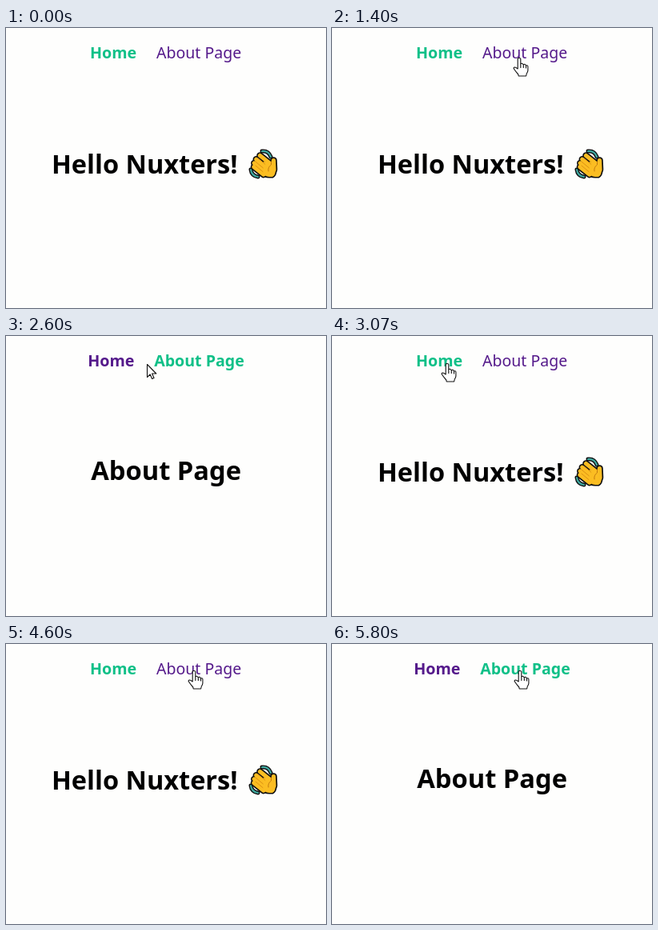
These frames come from a looping animation (400 by 350 pixels, 6.54 s). An HTML page with a canvas:

```html
<!DOCTYPE html>
<html lang="en">
<head>
<meta charset="utf-8">
<title>Page navigation</title>
<style>
html, body { margin: 0; width: 100%; height: 100%; overflow: hidden; background: #fefefd; }
canvas { display: block; }
</style>
</head>
<body>
<canvas id="stage" width="400" height="350"></canvas>
<script>
const ctx = document.getElementById('stage').getContext('2d');
const LOOP = 6540;
const STEP = 1000 / 15;
const FAMILY = '"Noto Sans", "Open Sans", sans-serif';
const PAPER = '#fefefd', INK = '#000', GREEN = '#10c088', PURPLE = '#551a8b';

const aboutShown = t => (t >= 1470 && t < 3000) || t >= 4870;

// Pointer journey: each leg eases from the previous resting place
const ENTRY = { time: 66, x: 250, y: 271 };
const legs = [
  { start: 66, end: 800, x: 234, y: 42 },
  { start: 1000, end: 1400, x: 234, y: 37 },
  { start: 2200, end: 2870, x: 144, y: 34 },
  { start: 3200, end: 3670, x: 235, y: 33 }
];

function ease(k) {
  k = Math.min(1, Math.max(0, k));
  return k * k * (3 - 2 * k);
}

function pointerAt(t) {
  let { x, y } = ENTRY;
  for (const leg of legs) {
    const e = ease((t - leg.start) / (leg.end - leg.start));
    x += (leg.x - x) * e;
    y += (leg.y - y) * e;
  }
  return { x: Math.round(x), y: Math.round(y) };
}

function text(str, x, y, size, weight, color) {
  ctx.font = `${weight} ${size}px ${FAMILY}`;
  ctx.fillStyle = color;
  ctx.fillText(str, x, y);
}

function curve(d, width, color) {
  ctx.lineWidth = width;
  ctx.strokeStyle = color;
  ctx.stroke(new Path2D(d));
}

function wave() {
  const dark = '#101010', skin = '#fbbd22';
  const arcs = 'M320 154 Q328 153 331 161 M306 177 Q307 185 315 186';
  curve(arcs, 5, dark);
  curve(arcs, 2.2, '#3fa9a0');

  let fingers = '', creases = '';
  for (let i = 0; i < 4; i++) {
    const x = 317.5 - 2.5 * i - 2.5 * Math.sin(Math.PI * i / 3);
    const y = 159.5 + 4.7 * i;
    fingers += `M${x} ${y} l12 9.5 `;
    if (i) creases += `M${x + 2} ${y - 1.5} l9 7.5 `;
  }
  const thumb = 'M334.5 165.5 L335 177 ';
  const palm = 'M318 179 Q323 186 329 186 L333 186 Q337 184 337 177 L336 170 L322 167 Z';
  curve(fingers + thumb, 8.6, dark);
  curve(palm, 3.2, dark);
  curve(fingers + thumb, 5.2, skin);
  ctx.fillStyle = skin;
  ctx.fill(new Path2D(palm));
  curve(creases, 0.9, '#d88c12');
  curve('M331.5 167 V171 Q327 174 328 179', 1, '#c47a10');
}

const hand = new Path2D('M-1.8 13 V1.6 Q-1.8 .5 0 .5 Q1.8 .5 1.8 1.6 V8 ' +
  'Q3.5 6 5.3 9 Q7 7 8.5 10 Q10.9 9 10.9 11.5 V16 Q10.8 18 9.3 20 L8.6 23 H-.8 L-1.2 21 ' +
  'Q-4 18 -6.8 13.8 Q-7 10 -1.8 14 Z M1.8 8 V12.5 M5.3 9 V12.5 M8.5 10 V13');
const arrow = new Path2D('M.5 .5 V16.5 L4.2 13 L6.6 18.5 L9 17.5 L6.6 12 H11.8 Z');

function pointer({ x, y }) {
  const overLink = y < 46 && (x < 164 || x > 185);
  const shape = overLink ? hand : arrow;
  ctx.save();
  ctx.translate(x, y);
  ctx.fillStyle = '#fff';
  ctx.strokeStyle = '#111';
  ctx.lineWidth = 1.1;
  ctx.fill(shape);
  ctx.stroke(shape);
  ctx.restore();
}

function homePage() {
  text('Home', 105, 38, 19.7, 700, GREEN);
  text('About Page', 188, 38, 19.5, 400, PURPLE);
  text('Hello Nuxters!', 57, 181.5, 32.5, 700, INK);
  wave();
}

function aboutPage() {
  text('Home', 102.2, 38, 19.7, 700, PURPLE);
  text('About Page', 185.2, 38, 19.6, 700, GREEN);
  text('About Page', 106.2, 179.5, 32.7, 700, INK);
}

function frame() {
  const t = performance.now() % LOOP;
  ctx.fillStyle = PAPER;
  ctx.fillRect(0, 0, 400, 350);
  ctx.lineCap = ctx.lineJoin = 'round';
  if (aboutShown(t)) aboutPage(); else homePage();
  // The pointer moves at a fixed 15 steps per second
  const tick = Math.floor((t + 1) / STEP) * STEP;
  if (tick >= ENTRY.time) pointer(pointerAt(tick));
  requestAnimationFrame(frame);
}
frame();
</script>
</body>
</html>
```
